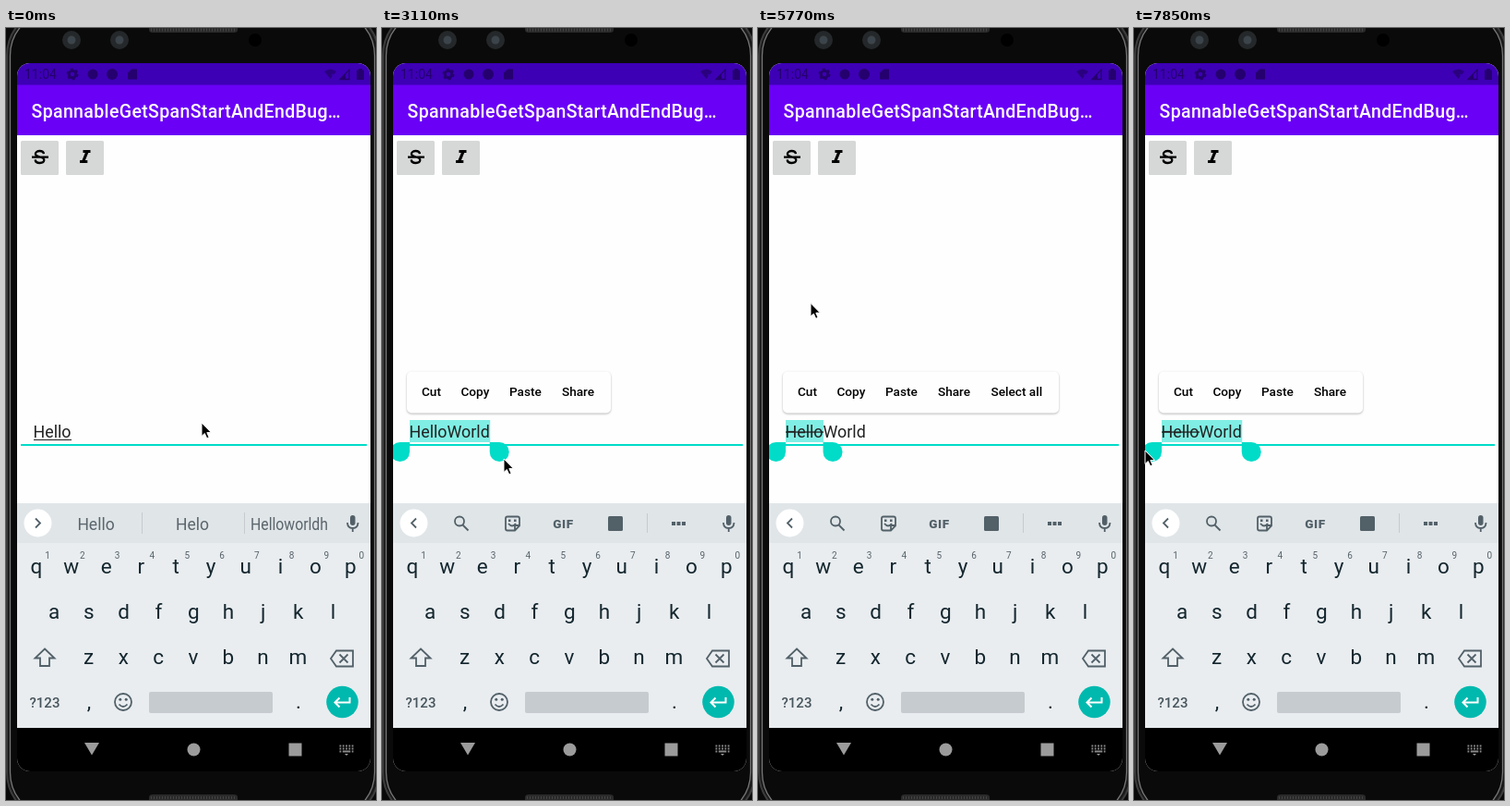
An HTML page for the animation above (8000 ms loop, 401 px wide and 835 px high).

```html
<!DOCTYPE html>
<html lang="en">
<head>
<meta charset="utf-8">
<title>Span selection demo</title>
<style>
  html, body { margin: 0; width: 100%; height: 100%; overflow: hidden; background: #090909; }
  svg { display: block; width: 401px; height: 835px; font-family: Roboto, sans-serif; }
  text { white-space: pre; }
  .mid { text-anchor: middle; }
  .key { font-size: 22.5px; fill: #14262e; }
  .hint { font-size: 10px; fill: #56636a; }
  .chip { font-size: 17.5px; fill: #5a656c; }
  .medium { font-weight: 500; }
  .icon { fill: none; stroke: #526068; stroke-width: 1.8; }
  .solid { fill: #526068; }
  .status { fill: #25006f; }
  .teal { fill: #00dcc8; }
  .popup { filter: drop-shadow(0 1px 1.2px rgba(0, 0, 0, .28)); }
</style>
</head>
<body>
<svg viewBox="0 0 401 835">
  <defs>
    <clipPath id="screen"><rect x="12" y="38" width="383" height="766" rx="14"/></clipPath>
    <clipPath id="lens"><rect id="lensClip" y="372" width="98" height="46" rx="5"/></clipPath>
  </defs>

  <rect width="401" height="835" fill="#090909"/>
  <rect x="1" y="-22" width="403" height="879" rx="52" fill="#1a1a1a" stroke="#3c3c3c" stroke-width="2"/>
  <rect x="4.500" y="-19" width="395" height="873" rx="49" fill="#0a0a0a" stroke="#777" stroke-width="1.300"/>
  <path d="M155 0h96v2q0 3-4 3h-88q-4 0-4-3zM155 835v-3q0-3 4-3h88q4 0 4 3v3z" fill="#2a2a2a"/>
  <path d="M157 2h92M157 832.500h92" stroke="#444" stroke-width="3" stroke-dasharray="1 2"/>
  <g fill="#25282a">
    <circle cx="71" cy="13" r="10"/><circle cx="123" cy="13" r="10"/>
    <g fill="#3b444a"><circle cx="71" cy="13" r="4.500"/><circle cx="123" cy="13" r="4.500"/></g>
    <circle cx="270" cy="13" r="7" fill="#000"/>
  </g>

  <g clip-path="url(#screen)">
    <rect x="12" y="38" width="383" height="766" fill="#fefefe"/>
    <rect x="12" y="38" width="383" height="24" fill="#3d00b5"/>
    <rect x="12" y="61.5" width="383" height="54.5" fill="#6a00f6"/>

    <g class="status">
      <text x="20" y="55" font-size="14">11:04</text>
      <circle cx="72" cy="50" r="3.800" fill="none" stroke="#25006f" stroke-width="3"/>
      <circle cx="72" cy="50" r="5.600" fill="none" stroke="#25006f" stroke-width="1.800" stroke-dasharray="2.9 2.96"/>
      <circle cx="94" cy="50" r="5.500"/>
      <circle cx="115" cy="50" r="6"/>
      <path d="M136 44.500h6v11h-10v-7z"/>
      <path d="M345 47q6.500-5 13 0l-6.500 8z" opacity=".75"/>
      <path d="M353 50l4 4m0-4l-4 4" stroke="#3d00b5" stroke-width="1.300"/>
      <path d="M372 45v10.500h-10z" fill="none" stroke="#25006f" stroke-width="1.300"/>
      <path d="M368 49v7h-7z"/>
      <path d="M380 45.500h2v-1.500h4v1.500h2v10.500h-8z"/>
    </g>
    <text class="medium" x="27.500" y="97" font-size="19.500" letter-spacing=".36" fill="#fff">SpannableGetSpanStartAndEndBug…</text>

    <rect id="strikeButton" x="16" y="122" width="41" height="37" rx="1.500" fill="#d6d7d7"/>
    <rect x="65" y="122" width="41" height="37" rx="1.500" fill="#d6d7d7"/>
    <path d="M41 136.200c-.3-2-2-3.200-4.500-3.200s-4.600 1.200-4.600 3.200c0 3.600 9.400 3 9.400 6.400 0 2.100-2 3.400-4.700 3.400s-4.800-1.200-4.900-3.600M28 139.700h18" fill="none" stroke="#000" stroke-width="2.300"/>
    <path d="M83.500 132h8v3h-2.300l-3.300 8h2.400v3h-8.300v-3h2.500l3.300-8h-2.300z"/>

    <g id="line">
      <rect id="highlight" x="30" y="424" height="24" fill="#80eee4"/>
      <rect class="teal" x="16" y="450" width="375" height="2"/>
      <text id="word" x="29.500" y="443" font-size="17.850" fill="#222"></text>
      <rect id="underline" x="30" y="445" height="1" fill="#222"/>
      <rect id="strike" x="30" y="436.400" height="1.300" fill="#222"/>
    </g>
    <rect id="caret" class="teal" y="424" width="2" height="26"/>

    <g id="handles" class="teal">
      <path d="M30 448v10.500a10.500 10.500 0 1 1-10.500-10.500z"/>
      <path id="endHandle" d="M0 448v10.500a10.500 10.500 0 1 0 10.500-10.500z"/>
    </g>

    <g id="magnifier">
      <rect id="lensBack" class="popup" y="372" width="98" height="46" rx="5" fill="#fefefe"/>
      <g clip-path="url(#lens)"><use id="lensView" href="#line"/></g>
    </g>

    <g id="menu" class="medium" font-size="13.600">
      <rect id="menuBack" class="popup" x="27" y="371.500" height="45" rx="5"/>
      <text x="43" y="398">Cut</text>
      <text x="85.500" y="398">Copy</text>
      <text x="138" y="398">Paste</text>
      <text x="195" y="398">Share</text>
      <text id="selectAll" x="252.500" y="398">Select all</text>
    </g>

    <rect x="12" y="514" width="383" height="243" fill="#e9edf0"/>
    <rect x="12" y="514" width="383" height="43" fill="#e0e5e8"/>
    <circle cx="34.500" cy="535.500" r="15" fill="#fff"/>
    <path id="chevron" class="icon" d="M-2.500-5l5 5-5 5"/>
    <rect class="solid" x="373" y="527" width="5.500" height="11" rx="2.750"/>
    <path class="icon" d="M370 535q0 6 5.750 6t5.750-6M375.750 541v4" stroke-width="1.500"/>

    <g id="chips">
      <path d="M147.500 524v23M258.500 524v23" stroke="#c5cbcf"/>
      <text class="chip mid"></text><text class="chip mid"></text><text class="chip mid"></text>
    </g>
    <g id="tools">
      <circle class="icon" cx="84" cy="533.500" r="5"/>
      <path class="icon" d="M87.500 537.500l6 6" stroke-width="2.300"/>
      <path class="icon" d="M136 528.500h11q2 0 2 2v8l-5 5h-8q-2 0-2-2v-11q0-2 2-2zM149 538h-5v5M137 536q4 5 8 0" stroke-width="1.600"/>
      <path class="solid" d="M137 531.500h2.500v2.500h-2.500zM143 531.500h2.500v2.500h-2.500z"/>
      <text class="mid solid" x="196.500" y="540.500" font-size="13.500" font-weight="900" letter-spacing=".6">GIF</text>
      <rect class="solid" x="245" y="528" width="16" height="16" rx="1.500"/>
      <path d="M287.500 525v21" stroke="#c5cbcf"/>
      <path class="solid" d="M314 534h4v4h-4zM319.500 534h4v4h-4zM325 534h4v4h-4z"/>
    </g>

    <g id="keys"></g>
    <path class="icon" d="M42 671.500l10.500 10h-5.500v8.500h-10v-8.500h-5.500z"/>
    <path class="icon" d="M358 673.500h18v17h-18l-6-8.500zM361.500 677.500l9 9m0-9l-9 9"/>
    <text class="mid medium" x="42" y="734.500" font-size="15" fill="#46545b">?123</text>
    <circle class="icon" cx="127" cy="729" r="9"/>
    <path class="icon" d="M122.500 731.500q4.500 5 9 0"/>
    <circle class="solid" cx="123.800" cy="726.300" r="1.500"/><circle class="solid" cx="130.200" cy="726.300" r="1.500"/>
    <rect x="155" y="718" width="134" height="23" rx="2" fill="#c6cbcf"/>
    <circle cx="364.500" cy="729" r="17.300" fill="#00b9ae"/>
    <path d="M372.500 724v5.500h-16m5-5l-5 5 5 5" fill="none" stroke="#fff" stroke-width="2"/>

    <rect x="12" y="757" width="383" height="47" fill="#000"/>
    <g fill="#9b9b9b">
      <path d="M85 773h16l-8 13.500z"/><circle cx="203.500" cy="780.500" r="7"/><rect x="306.500" y="773.500" width="14" height="14"/>
      <path d="M361.500 776.500h15m-15 3h15" stroke="#8a8a8a" stroke-width="1.800" stroke-dasharray="1.800 1.500"/>
      <path d="M361.500 782.500h1.800m1.500 0h8.500m1.500 0h1.700" stroke="#8a8a8a" stroke-width="1.800"/>
      <path d="M367 785h4l-2 2z"/>
    </g>
  </g>

  <path id="pointer" d="M0 0v14.500l3.300-3 2.400 5.300 2.400-1-2.300-5.200h4.600z" fill="#000" stroke="#fff" stroke-width="1"/>
</svg>

<script>
const $ = id => document.getElementById(id);
const set = (el, attrs) => { for (const name in attrs) el.setAttribute(name, attrs[name]); };
const show = (el, on) => { el.style.display = on ? '' : 'none'; };

const LOOP = 8000, STEPS = 54;

// Each track is a list of [step, value...]
const typed = [[0, 5], [1, 6], [4, 7], [6, 8], [8, 9], [10, 10]];
const selection = [[0, 0], [16, 10], [25, 7], [26, 6], [27, 5], [45, 6], [46, 8], [47, 10]];
const menuWidth = [[0, 0], [18, 221], [24, 0], [33, 299], [45, 0], [48, 221]];
const menuAlpha = [[0, 1], [18, .45], [19, 1], [33, .4], [34, .75], [35, 1], [48, .45], [49, 1]];
const guesses = [
  [0, 'Helo', 'Helloworldh'], [1, 'Hello', 'Helloworldw'],
  [8, 'HelloWorld', 'Helloworldh'], [10, 'Helloworldh', 'HelloWorldw']
];
const pointerPath = [
  [0, 212, 427], [10, 212, 427], [13, 68, 437], [17, 68, 437], [21, 132, 466], [23, 126, 457],
  [25, 103, 456], [26, 90, 455], [28, 72, 455], [32, 72, 455], [34, 57, 163],
  [36, 32, 140], [38, 32, 140], [40, 82, 455], [44, 86, 456], [47, 125, 457], [49, 125, 457], [53, 12, 457]
];
const lensPath = [[25, 108], [26, 95], [28, 76], [32, 76], [44, 82], [47, 122]];

const hold = (track, step) => track.filter(key => key[0] <= step).pop().slice(1);
function glide(track, step) {
  const next = track.findIndex(key => key[0] > step);
  if (next < 0) return track[track.length - 1].slice(1);
  if (!next) return track[0].slice(1);
  const a = track[next - 1], b = track[next], k = (step - a[0]) / (b[0] - a[0]);
  return a.slice(1).map((v, i) => v + (b[i + 1] - v) * k);
}

function addKey(label, x, y, kind = 'key') {
  const key = document.createElementNS('http://www.w3.org/2000/svg', 'text');
  key.textContent = label;
  set(key, { x, y, class: kind + ' mid' });
  $('keys').append(key);
}
[['qwertyuiop', 33, 590], ['asdfghjkl', 52, 639], ['zxcvbnm', 89.5, 688]].forEach(([row, x, y]) =>
  [...row].forEach((letter, i) => addKey(letter, x + i * 37.8, y)));
[...'1234567890'].forEach((digit, i) => addKey(digit, 45 + i * 37.8, 574, 'hint'));
addKey(',', 90, 736);
addKey('.', 317, 736);

const word = $('word');
const chips = [...$('chips').querySelectorAll('text')];
const widthOf = count => count ? word.getSubStringLength(0, count) : 0;

// The last suggestion is condensed when it is wider than its cell.
function drawChips(labels) {
  chips.forEach((chip, i) => {
    chip.textContent = labels[i];
    const fit = i === 2 ? Math.min(1, 84 / chip.getComputedTextLength()) : 1;
    set(chip, { transform: `translate(${[97.5, 202, 307][i]} 542.5) scale(${fit} 1)` });
  });
}

function drawText(step) {
  const count = hold(typed, step)[0];
  word.textContent = 'HelloWorld'.slice(0, count);
  const chosen = widthOf(hold(selection, step)[0]);
  set($('highlight'), { width: chosen });
  set($('underline'), { width: step < 16 ? widthOf(count) : 0 });
  set($('strike'), { width: step >= 38 ? widthOf(5) : 0 });
  set($('caret'), { x: 29.5 + widthOf(step < 14 ? count : 5) });
  show($('caret'), step > 0 && step < 16);
  set($('endHandle'), { transform: `translate(${29.5 + chosen})` });
  show($('handles'), step >= 18);
}

function drawKeyboardBar(step) {
  const tools = step >= 17;
  show($('chips'), !tools);
  show($('tools'), tools);
  set($('chevron'), { transform: `translate(34.5 535.5) scale(${tools ? -1 : 1} 1)` });
  if (!tools) drawChips([word.textContent, ...hold(guesses, step)]);
}

function drawMagnifier(step) {
  const center = glide(lensPath, step)[0];
  show($('magnifier'), (step >= 25 && step <= 32) || (step >= 44 && step <= 47));
  set($('lensClip'), { x: center - 49 });
  set($('lensBack'), { x: center - 49 });
  set($('lensView'), { transform: `translate(${center} 403) scale(1.25) translate(${-center} -443)` });
}

function drawMenu(step) {
  const width = hold(menuWidth, step)[0], alpha = hold(menuAlpha, step)[0];
  show($('menu'), width);
  show($('selectAll'), width > 250);
  set($('menu'), { opacity: alpha });
  set($('menuBack'), { width, fill: alpha < 1 ? '#eee' : '#fefefe' });
}

function draw(step) {
  drawText(step);
  drawKeyboardBar(step);
  drawMagnifier(step);
  drawMenu(step);
  set($('strikeButton'), { fill: step === 37 || step === 38 ? '#c2c3c3' : '#d6d7d7' });
  const [x, y] = glide(pointerPath, step);
  set($('pointer'), { transform: `translate(${x} ${y})` });
  show($('pointer'), step < 1 || step > 10);
}

let shown = -1;
function tick() {
  const time = performance.now() % LOOP;
  const step = Math.floor((time + 10) * STEPS / LOOP) % STEPS;
  if (step !== shown) draw(shown = step);
  requestAnimationFrame(tick);
}
tick();
</script>
</body>
</html>
```
